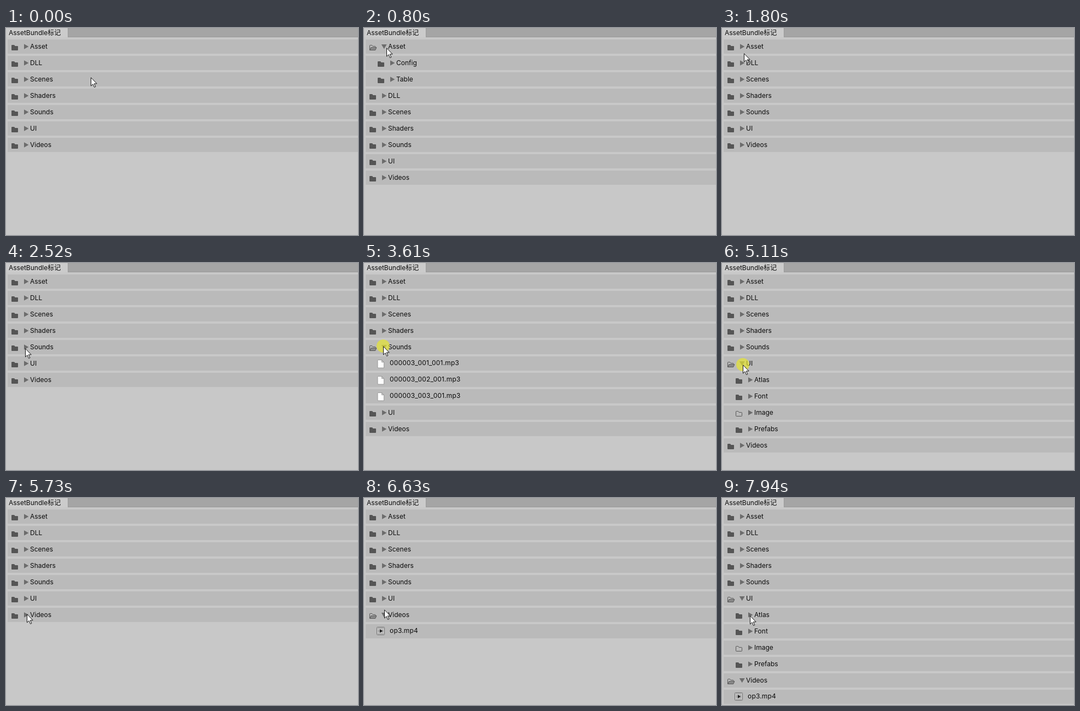
An HTML page that plays this animation: 644x379 px, repeating every 8 s.

```html
<!DOCTYPE html>
<html lang="zh">
<head>
<meta charset="utf-8">
<title>AssetBundle标记</title>
<style>
  html, body { margin: 0; width: 100%; height: 100%; overflow: hidden; background: #c8c8c8; }
  svg { display: block; }
  text { font: 12px Inter, "Noto Sans CJK SC", "Noto Sans CJK", sans-serif; fill: #0b0b0b; white-space: pre; }
  .file { letter-spacing: .18px; }
</style>
</head>
<body>
<svg width="644" height="379" viewBox="0 0 644 379">
  <defs>
    <path id="closed" fill="#555" d="M10 32q0-1 1-1h3.6q.6 0 1 .6l.9 1.4H21q1 0 1 1v6q0 1-1 1H11q-1 0-1-1z"/>
    <path id="empty" fill="none" stroke="#555" d="M10.5 32.3q0-.8.8-.8h3.2q.5 0 .8.5l.9 1.5h4.5q.8 0 .8.8v5.4q0 .8-.8.8h-9.4q-.8 0-.8-.8z"/>
    <g id="opened" stroke="#555" stroke-linejoin="round">
      <path fill="none" d="M10.5 40.5v-8.2q0-.8.8-.8h3.2l1.6 2h4.2q.7 0 .7.8v1.4"/>
      <path fill="#8a8a8a" d="M10.7 40.5l2.2-4.8h10l-2.2 4.8z"/>
    </g>
    <g id="file">
      <path fill="#fdfdfd" stroke="#8d8d8d" stroke-width=".8" d="M11 27.5h6.5l4 4V42H11q-1 0-1-1V28.5q0-1 1-1z"/>
      <path fill="#d2d2d2" stroke="#8d8d8d" stroke-width=".8" d="M17.5 27.5v4h4z"/>
    </g>
    <g id="video">
      <rect x="8.5" y="26.5" width="14" height="14" rx="1" fill="#d9d9d9" stroke="#6b6b6b"/>
      <path stroke="#555" stroke-width="1.6" stroke-dasharray="1 1" d="M10 28.5h12M10 38.5h12"/>
      <path fill="#a9a9a9" d="M10 30.5h11v6H10z"/>
      <path fill="#1c1c1c" d="M14 30.3l5 3.2-5 3.2z"/>
    </g>
    <path id="right" fill="#6c6c6c" d="M33 29.2v9.6l8.4-4.8z"/>
    <path id="down" fill="#6c6c6c" d="M31.8 30h9.8l-4.9 8.3z"/>
  </defs>
  <rect width="644" height="379" fill="#c8c8c8"/>
  <rect width="644" height="16" fill="#a5a5a5"/>
  <rect y="16" width="644" height="1" fill="#999"/>
  <rect width="113" height="17" fill="#cbcbcb"/>
  <rect x="113" width="1" height="17" fill="#999"/>
  <text x="5" y="13">AssetBundle标记</text>
  <g id="rows"></g>
  <circle id="press" r="12" fill="#e8e62c" fill-opacity=".68"/>
  <path id="cursor" fill="#fff" stroke="#111" stroke-width="1" d="M.5.8V16l3.5-3.3 2.6 5.8 2.3-1-2.6-5.6h4.9z"/>
</svg>
<script>
const LOOP = 8000;
const tree = [
  ["Asset", ["Config", "Table"]],
  ["DLL"],
  ["Scenes"],
  ["Shaders"],
  ["Sounds", ["000003_001_001.mp3", "000003_002_001.mp3", "000003_003_001.mp3"]],
  ["UI", ["Atlas", "Font", "Image", "Prefabs"]],
  ["Videos", ["op3.mp4"]],
];

// time, cursor x, cursor y, pressed, initials of open folders
const steps = [
  [0, 155, 90, 0, ""],
  [90, 146, 86, 0, ""],
  [190, 122, 76, 0, ""],
  [290, 92, 62, 0, ""],
  [400, 65, 49, 0, ""],
  [500, 48, 41, 0, ""],
  [600, 42, 38, 0, ""],
  [700, 41, 38, 1, ""],
  [800, 41, 36, 0, "A"],
  [1400, 41, 36, 1, "A"],
  [1500, 41, 36, 0, ""],
  [1800, 40, 46, 0, ""],
  [1900, 38, 63, 0, ""],
  [2100, 36, 82, 0, ""],
  [2210, 33, 108, 0, ""],
  [2310, 31, 132, 0, ""],
  [2420, 33, 149, 0, ""],
  [2520, 35, 156, 0, ""],
  [2710, 35, 152, 0, ""],
  [2910, 35, 152, 1, ""],
  [3010, 35, 152, 0, "S"],
  [3610, 35, 152, 1, "S"],
  [3710, 35, 152, 0, ""],
  [3920, 36, 161, 0, ""],
  [4020, 37, 176, 0, ""],
  [4130, 38, 185, 0, ""],
  [4420, 38, 185, 1, ""],
  [4520, 38, 186, 0, "U"],
  [5110, 38, 186, 1, "U"],
  [5210, 38, 186, 0, ""],
  [5310, 38, 193, 0, ""],
  [5410, 38, 205, 0, ""],
  [5630, 38, 209, 0, ""],
  [5730, 38, 212, 0, ""],
  [5830, 38, 212, 1, ""],
  [5930, 38, 212, 0, "V"],
  [6030, 38, 211, 0, "V"],
  [6130, 38, 209, 0, "V"],
  [6630, 37, 204, 0, "V"],
  [6730, 36, 194, 0, "V"],
  [6830, 35, 187, 0, "V"],
  [6930, 34, 184, 0, "V"],
  [7030, 34, 184, 1, "V"],
  [7140, 34, 184, 0, "UV"],
  [7240, 33, 184, 0, "UV"],
  [7340, 32, 184, 0, "UV"],
  [7440, 34, 195, 0, "UV"],
  [7540, 38, 209, 0, "UV"],
  [7640, 43, 218, 0, "UV"],
  [7940, 51, 215, 0, "UV"],
];

const el = id => document.getElementById(id);
const use = (id, x = 0) => `<use href="#${id}" x="${x}"/>`;
const label = (name, x, y, cls = "") => `<text class="${cls}" x="${x}" y="${y}">${name}</text>`;

function content(name, indent, open) {
  const media = name.endsWith(".mp4");
  if (media || name.endsWith(".mp3"))
    return use(media ? "video" : "file", indent) + label(name, indent + 32, 37, "file");
  const icon = open ? "opened" : name === "Image" ? "empty" : "closed";
  return use(icon, indent) + use(open ? "down" : "right", indent) + label(name, indent + 44, 38);
}

function rowsFor(open) {
  const rows = [];
  tree.forEach(([name, children = []]) => {
    const isOpen = children.length > 0 && open.includes(name[0]);
    rows.push(content(name, 0, isOpen));
    if (isOpen) rows.push(...children.map(child => content(child, 15, false)));
  });
  return rows.map((row, i) =>
    `<g transform="translate(0 ${i * 30})"><rect x="3" y="21" width="641" height="26" fill="#bababa"/>${row}</g>`
  ).join("");
}

let shown = null;
function draw() {
  const t = performance.now() % LOOP;
  const step = steps.findLast(s => s[0] <= t);
  if (step !== shown) {
    const [, x, y, pressed, open] = step;
    if (!shown || shown[4] !== open) el("rows").innerHTML = rowsFor(open);
    const place = `translate(${x} ${y})`;
    el("cursor").setAttribute("transform", place);
    el("press").setAttribute("transform", place);
    el("press").setAttribute("visibility", pressed ? "visible" : "hidden");
    shown = step;
  }
  requestAnimationFrame(draw);
}
draw();
</script>
</body>
</html>
```
